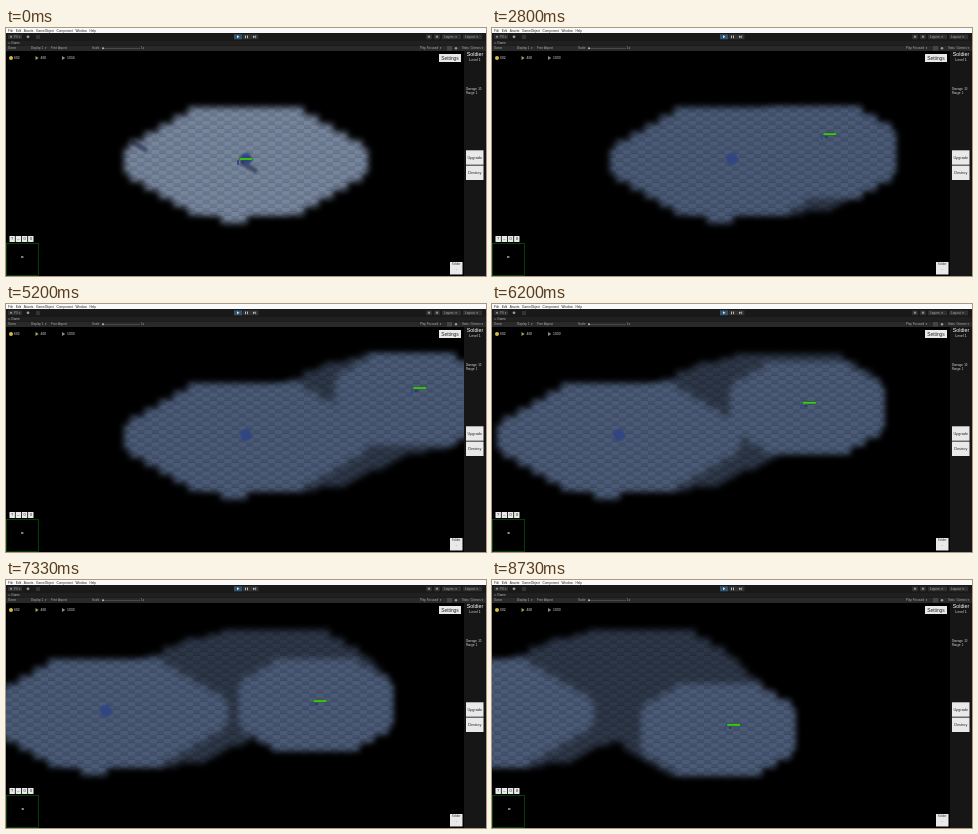
Recreate the animation shown at these times as an HTML page with a canvas. Size 480 px wide and 248 px high, loop 8.79 s.

```html
<!DOCTYPE html>
<html>
<head>
<meta charset="utf-8">
<style>
html, body { margin: 0; width: 100%; height: 100%; overflow: hidden; background: #000; }
canvas { display: block; width: 480px; height: 248px; }
</style>
</head>
<body>
<canvas id="stage" width="480" height="248"></canvas>
<script>
const W = 480, H = 248, LOOP = 8790, FRAMES = 132;
const CELL_W = 14.5, CELL_H = 8.3;
const BASE = { x: 240, y: 131 };
const FOG_LAG = 300;
const FONT = '"Liberation Sans", Arial, sans-serif';
const ctx = document.getElementById('stage').getContext('2d');

function makeLayer(w, h) {
  const layer = document.createElement('canvas');
  layer.width = w;
  layer.height = h;
  return layer.getContext('2d');
}
const land = makeLayer(W, H);

// Staggered floor tiles, one pattern period per fog cell
function makeFloor(light, dark, line) {
  const tile = makeLayer(16, 10);
  const fill = (color, x, y, w, h) => {
    tile.fillStyle = color;
    tile.fillRect(x, y, w, h);
  };
  fill(light, 0, 0, 16, 10);
  for (const i of [0, 1]) {
    fill(dark, i * 8, i * 5, 8, 5);
    fill(line, i * 8, i * 5 + 4, 8, 1);
  }
  const floor = land.createPattern(tile.canvas, 'repeat');
  floor.setTransform(new DOMMatrix().translate(BASE.x, BASE.y - 1).scale(CELL_W / 16, CELL_H / 10));
  return floor;
}
const dayFloor = makeFloor('#77859b', '#6a788f', '#606e86');
const nightFloor = makeFloor('#4b5b77', '#425169', '#3b4961');

// Key points of the walk: time and health bar position
const route = [
  [0, 240, 131], [1870, 292, 127], [2800, 338, 106], [3670, 358, 95],
  [5200, 414, 84], [6470, 435, 103], [8130, 472, 138], [8730, 502, 145]
];

const ramp = (t, from, to) => Math.max(0, Math.min(1, (t - from) / (to - from)));
const snap = (v, step) => Math.round(v / step) * step;

function unitAt(t) {
  const i = Math.max(1, route.findIndex(p => p[0] >= t));
  const [t0, x0, y0] = route[i - 1], [t1, x1, y1] = route[i];
  const k = ramp(t, t0, t1);
  return [x0 + (x1 - x0) * k, y0 + (y1 - y0) * k];
}

// Stepped octagon: each row narrows by one cell once it passes the diagonal limit
function addSight(path, x, y, halfWidth, rows, reach) {
  for (let row = -rows; row <= rows; row++) {
    const half = Math.min(halfWidth, (reach - Math.abs(row)) * CELL_W);
    path.rect(x - half, y + (row - .5) * CELL_H, half * 2, CELL_H + .1);
  }
}

function addUnitSight(path, t) {
  const [x, y] = unitAt(Math.max(0, t - FOG_LAG));
  addSight(path, snap(x + 2, CELL_W / 2), snap(y + 10, CELL_H / 2), 77, 5, 8);
}

function drawShadow(x, y, length) {
  land.lineWidth = 5;
  land.strokeStyle = '#404d67';
  land.beginPath();
  land.moveTo(x, y);
  land.lineTo(x + length, y + length * .6);
  land.stroke();
}

function drawLand(t, camera) {
  const explored = new Path2D(), visible = new Path2D();
  for (let past = 0; past < t; past += 130) addUnitSight(explored, past);
  addUnitSight(explored, t);
  addSight(visible, BASE.x, BASE.y + 2, 122, 6, 10);
  visible.rect(BASE.x - 25, BASE.y + 56, 26, CELL_H);
  addUnitSight(visible, t);

  land.clearRect(0, 0, W, H);
  land.save();
  land.translate(-camera, 0);
  land.filter = 'blur(3.4px)';
  land.fillStyle = 'rgba(0,0,0,.6)';
  land.fill(explored);
  land.fillStyle = '#000';
  land.fill(visible);
  land.filter = 'none';

  land.globalCompositeOperation = 'source-in';
  land.fillStyle = nightFloor;
  land.fillRect(0, 0, W + camera, H);
  land.globalCompositeOperation = 'source-atop';
  land.globalAlpha = 1 - ramp(t, 0, 1800);
  land.fillStyle = dayFloor;
  land.fillRect(0, 0, W + camera, H);

  land.filter = 'blur(.8px)';
  drawShadow(BASE.x - 5, BASE.y + 3, 16);
  drawShadow(BASE.x - 115, BASE.y - 18, 16);
  land.globalAlpha = 1;
  land.fillStyle = '#304582';
  land.beginPath();
  land.arc(BASE.x, BASE.y, 6, 0, 7);
  land.fill();
  land.restore();
  ctx.drawImage(land.canvas, 0, 0);
}

function box(x, y, w, h, color) {
  ctx.fillStyle = color;
  ctx.fillRect(x, y, w, h);
}

function dot(x, y, r, color) {
  ctx.fillStyle = color;
  ctx.beginPath();
  ctx.arc(x, y, r, 0, 7);
  ctx.fill();
}

function label(text, x, y, size, color, align = 'left') {
  ctx.font = `${size}px ${FONT}`;
  ctx.textAlign = align;
  ctx.textBaseline = 'middle';
  ctx.fillStyle = color;
  ctx.fillText(text, x, y);
  return ctx.measureText(text).width;
}

function button(text, x, y, w, h, size) {
  box(x, y, w, h, '#e9e9e9');
  label(text, x + w / 2, y + h / 2 + .2, size, '#222', 'center');
}

function arrow(x, y, size, color) {
  ctx.fillStyle = color;
  ctx.beginPath();
  ctx.moveTo(x, y - size);
  ctx.lineTo(x + size * 1.6, y);
  ctx.lineTo(x, y + size);
  ctx.fill();
}

function drawUnit(t, camera) {
  const [wx, y] = unitAt(t), x = wx - camera;
  box(x - 9, y + 1, 2, 5, '#354b85');
  box(x - 5, y + 2, 3, 2, '#2c3d5c');
  box(x - 7, y - 1.2, 14, 2.4, '#1d5a16');
  box(x - 6.5, y - .8, 13, 1.6, '#43d513');
}

function drawEditor() {
  box(0, 0, W, 5, '#fafafa');
  let x = 2;
  for (const item of ['File', 'Edit', 'Assets', 'GameObject', 'Component', 'Window', 'Help']) {
    x += label(item, x, 2.7, 3.2, '#222') + 2.6;
  }
  box(0, 5, W, 8, '#191919');
  box(0, 13, W, 4.5, '#202020');
  box(0, 17.5, W, 5.5, '#292929');

  box(2, 6.5, 14, 4.5, '#303030');
  dot(5, 8.8, 1, '#999');
  label('PS ▾', 8, 8.9, 3, '#999');
  dot(22, 8.8, 1.4, '#999');
  box(30, 7, 4, 4, '#333');
  box(228, 6.3, 8, 5, '#30536f');
  box(236.5, 6.3, 16, 5, '#303030');
  arrow(231, 8.8, 1.5, '#ddd');
  box(239, 7.5, 1, 2.7, '#bbb');
  box(241, 7.5, 1, 2.7, '#bbb');
  arrow(247, 8.8, 1.4, '#bbb');
  box(249.3, 7.5, .8, 2.7, '#bbb');
  for (const iconX of [423, 431]) {
    box(iconX - 3, 6.5, 6, 4.7, '#303030');
    dot(iconX, 8.8, 1.2, '#888');
  }
  ['Layers  ▾', 'Layout  ▾'].forEach((text, i) => {
    box(436 + i * 21, 6.5, 19, 4.7, '#303030');
    label(text, 438 + i * 21, 8.9, 3.2, '#aaa');
  });

  label('∞ Game', 2, 15.4, 3.2, '#bbb');
  const small = (text, left) => label(text, left, 20.3, 3, '#aaa');
  small('Game', 2);
  small('Display 1  ▾', 25);
  small('Free Aspect', 45);
  small('Scale', 86);
  box(96, 20, 38, .5, '#666');
  dot(97, 20.2, 1, '#bbb');
  small('1x', 135);
  small('Play Focused  ▾', 414);
  box(441, 18, 5, 4.5, '#444');
  dot(450, 20.2, 1.2, '#999');
  small('Stats  Gizmos ▾', 456);
}

function drawHud(t, camera) {
  const stone = t < 1930 ? '1034' : '1030';
  [['602', '#d9b94c'], ['460', '#a99a5c'], [stone, '#888e94']].forEach(([amount, color], i) => {
    const x = 5 + i * 26.5;
    if (i) arrow(x - 2, 30, 2, color);
    else dot(x, 30, 2, color);
    label(amount, x + 3, 30.2, 3.4, '#ddd');
  });

  box(458, 23, 22, 225, '#161616');
  label('Soldier', 469, 27, 5.3, '#fff', 'center');
  label('Level 1', 469, 32, 3.5, '#ddd', 'center');
  label('Damage: 10', 460, 61.5, 2.8, '#ddd');
  label('Range: 1', 460, 65.5, 2.8, '#ddd');
  button('Settings', 433, 26, 22, 8, 4.8);
  button('Upgrade', 460, 122.3, 17.5, 14.4, 3.8);
  button('Destroy', 460, 137.6, 17.5, 14.4, 3.8);
  button('', 444, 234, 12.5, 12.5, 3);
  label('Soldier', 450.2, 236.5, 2.8, '#333', 'center');
  label('1', 450.2, 241.5, 2.5, '#777', 'center');
  ['?', '–', '0', 'II'].forEach((key, i) => button(key, 3.5 + i * 6.2, 208, 5.4, 6, 4));

  box(0, 215, 33, 33, '#000');
  ctx.strokeStyle = '#0a5c0a';
  ctx.lineWidth = .7;
  ctx.strokeRect(.5, 215.5, 31.8, 32);
  const mapX = 15 + camera / 260;
  box(mapX, 228, 2.5, 2, '#5d6b83');
  box(mapX + .5, 228.5, 1, 1, '#aebbd0');
}

function draw(now) {
  const t = Math.floor(now % LOOP / LOOP * FRAMES) * LOOP / FRAMES;
  const camera = 140 * ramp(t, 5870, 6270) + 120 * ramp(t, 8400, 8710);
  box(0, 0, W, H, '#000');
  drawLand(t, camera);
  drawUnit(t, camera);
  drawEditor();
  drawHud(t, camera);
}

const start = performance.now();
function tick() {
  draw(performance.now() - start);
  requestAnimationFrame(tick);
}
tick();
</script>
</body>
</html>
```
